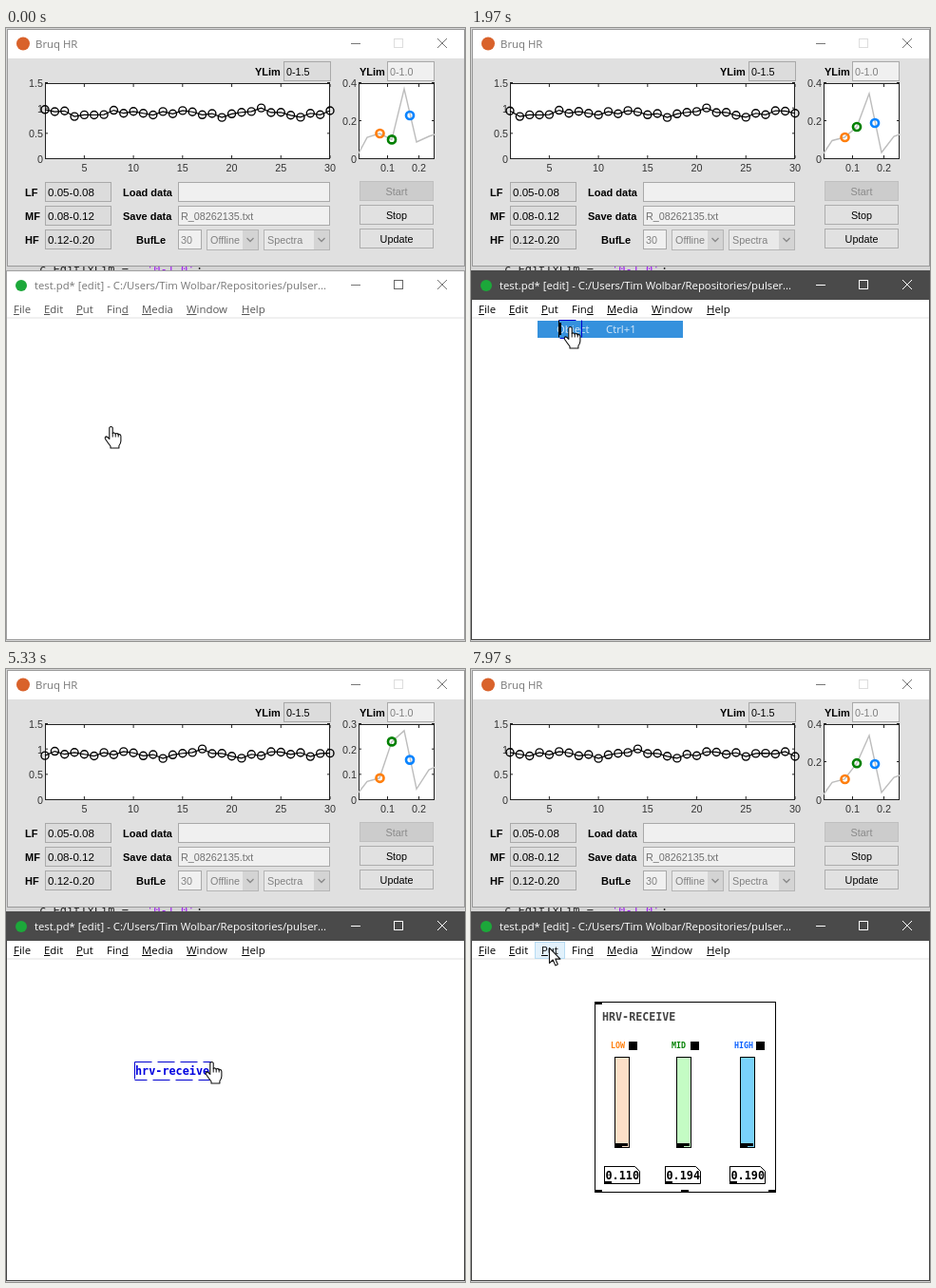
Write an HTML page with a canvas that moves like this. It is 483 by 645 pixels and loops after 8 s.

```html
<!DOCTYPE html>
<html lang="en">
<head>
<meta charset="utf-8">
<title>Heart rate patch</title>
<style>
html, body { margin: 0; width: 100%; height: 100%; overflow: hidden; background: #fff; }
canvas { display: block; }
</style>
</head>
<body>
<canvas id="stage" width="483" height="645"></canvas>
<script>
const g = document.getElementById('stage').getContext('2d');
const LOOP = 8000, FIRST_BEAT = 570, BEAT = 900;
const CREATED = 5560, GRAB = 5830, DROP = 6230;
const SANS = '10.8px "Liberation Sans", Arial, sans-serif';
const FIELD = SANS.replace('10.8', '11.6');
const BOLD = 'bold ' + SANS.replace('10.8', '11');
const UI = '11.4px "Open Sans", sans-serif';
const BLUE = '#0000d0';
const mono = size => `bold ${size}px "DejaVu Sans Mono", monospace`;
const clamp = (v, lo, hi) => Math.min(hi, Math.max(lo, v));

// Beat interval in seconds: slow, breathing and fast rhythms
const interval = i => .909 + .041 * Math.cos(.861 * i) + .026 * Math.cos(.587 * i - .18)
  - .035 * Math.cos(2.513 * i - 1.65);

// Band powers; the line swings above and below the high band's marker
const bands = (beat, low, mid, high, swing, midX = 406, highX = 425) =>
  ({ beat, low, mid, high, swing, midX, highX });
const spectra = [
  bands(0, .135, .103, .230, .14),
  bands(1, .115, .170, .190, .155),
  bands(3, .250, .250, .155, 0, 394, 414),
  bands(4, .115, .220, .215, .175),
  bands(6, .087, .231, .159, .115),
  bands(9, .110, .194, .190, .15)
];

// Pointer moves: start, end, goal
const moves = [
  [30, 200, 140, 392], [570, 1150, 91, 300], [1430, 1730, 104, 314], [1970, 2620, 139, 416],
  [2870, 2970, 216, 413], [5330, 5520, 270, 375], [5600, 5780, 228, 470],
  [GRAB, DROP, 223, 407], [6400, 6620, 347, 469], [6830, 7230, 340, 577], [7300, 7900, 82, 293]
];

function pointerAt(t) {
  let x = 110, y = 419;
  for (const [from, to, goalX, goalY] of moves) {
    const u = clamp((t - from) / (to - from), 0, 1);
    const e = u * u * (3 - 2 * u);
    x += (goalX - x) * e;
    y += (goalY - y) * e;
  }
  return [Math.round(x), Math.round(y)];
}

function text(s, x, y, color = '#000', font = SANS, align = 'left') {
  g.font = font;
  g.fillStyle = color;
  g.textAlign = align;
  g.fillText(s, x, y);
}

function fill(x, y, w, h, color) {
  g.fillStyle = color;
  g.fillRect(x, y, w, h);
}

// Box with a one pixel edge inside its bounds
function box(x, y, w, h, color, edge) {
  fill(x, y, w, h, color);
  g.strokeStyle = edge;
  g.lineWidth = 1;
  g.strokeRect(x + .5, y + .5, w - 1, h - 1);
}

function line(points, color, width = 1) {
  g.beginPath();
  points.forEach(p => g.lineTo(p[0], p[1]));
  g.strokeStyle = color;
  g.lineWidth = width;
  g.stroke();
}

function dot(x, y, r, color) {
  g.beginPath();
  g.arc(x, y, r, 0, Math.PI * 2);
  g.fillStyle = color;
  g.fill();
}

function ring(x, y, color, width) {
  g.beginPath();
  g.arc(x, y, 4, 0, Math.PI * 2);
  g.strokeStyle = color;
  g.lineWidth = width;
  g.stroke();
}

function windowButtons(y, color, middle) {
  line([[363, y + .5], [373, y + .5]], color);
  g.strokeStyle = middle;
  g.strokeRect(408.5, y - 4.5, 9, 9);
  line([[454, y - 5], [464, y + 5]], color);
  line([[464, y - 5], [454, y + 5]], color);
}

function entry(s, x, y, w, back, color, font) {
  box(x, y, w, 21, back, '#a9a9a9');
  text(s, x + 3, y + 15, color, font);
}

function dropdown(s, x, w) {
  box(x, 212, w, 22, '#e9e9e9', '#b5b5b5');
  fill(x + w - 17, 213, 16, 20, '#d4d4d4');
  text(s, x + 4, 227, '#808080');
  const c = x + w - 9;
  line([[c - 3.5, 221], [c, 224.5], [c + 3.5, 221]], '#888', 1.3);
}

function button(s, y, on) {
  box(372, y, 78, 21, on ? '#e1e1e1' : '#ccc', on ? '#adadad' : '#bfbfbf');
  text(s, 411, y + 15, on ? '#000' : '#8a8a8a', SANS, 'center');
}

// White plot with labelled ticks on all four sides
function axes(left, width, top, step, xTicks) {
  const right = left + width;
  box(left, 58, width, 80, '#fff', '#222');
  for (let v = 0; v <= top + .01; v += step) {
    const y = 138 - v / top * 80;
    text(+v.toFixed(1), left - 2, y + 4, '#333', SANS, 'right');
    line([[left, y - .5], [left + 3, y - .5]], '#222');
    line([[right - 3, y - .5], [right, y - .5]], '#222');
  }
  xTicks.forEach(([s, x]) => {
    text(s, x, 151, '#333', SANS, 'center');
    line([[x, 137], [x, 134]], '#222');
    line([[x, 59], [x, 62]], '#222');
  });
}

function drawTrace(n) {
  const x = i => 41 + i * 300 / 29;
  axes(41, 300, 1.5, .5, [5, 10, 15, 20, 25, 30].map(k => [k, x(k - 1)]));
  const points = Array.from({ length: 30 }, (_, i) => [x(i), 138 - interval(n + i) / 1.5 * 80]);
  line(points, '#000', 1.2);
  points.forEach(p => ring(...p, '#000', 1.4));
}

function drawSpectrum({ low, mid, high, swing, midX, highX }) {
  const top = high + swing > .3 ? .4 : .3;
  const at = (x, v) => [x, 138 - v / top * 80];
  axes(371, 80, top, top > .3 ? .2 : .1, [['0.1', 401.5], ['0.2', 434.5]]);
  line([at(371, .03), at(380, low * .85), at(393, low), at(midX, mid), at(highX - 6, high + swing),
    at(highX + 7, high - swing), at(445, .12), at(451, .13)], '#bdbdbd', 1.4);
  ring(...at(393.5, low), '#ff7f0e', 2.7);
  ring(...at(midX, mid), '#008000', 2.7);
  ring(...at(highX, high), '#0a84ff', 2.7);
}

function drawMonitor(n, spectrum) {
  const gray = '#dcdcdc', light = '#f0f0f0';
  box(1, 1, 482, 250, '#e0e0e0', '#9a9a9a');
  fill(2, 2, 480, 30, '#fff');
  dot(18, 16.5, 7, '#d9622b');
  text('Bruq HR', 31, 21, '#777', UI);
  windowButtons(16, '#777', '#ddd');
  text('YLim', 262, 50, '#000', BOLD);
  entry('0-1.5', 292, 35, 50, gray);
  text('YLim', 372, 50, '#000', BOLD);
  entry('0-1.0', 401, 35, 50, light, '#808080');
  ['LF|0.05-0.08', 'MF|0.08-0.12', 'HF|0.12-0.20'].forEach((row, i) => {
    const [label, range] = row.split('|');
    text(label, 20, 177 + 25 * i, '#000', BOLD);
    entry(range, 41, 162 + 25 * i, 70, gray, '#000', FIELD);
  });
  text('Load data', 123, 177, '#000', BOLD);
  entry('', 181, 162, 160, light);
  text('Save data', 123, 202, '#000', BOLD);
  entry('R_08262135.txt', 181, 187, 160, light, '#707070');
  text('BufLe', 137, 227, '#000', BOLD);
  entry('30', 181, 212, 25, light, '#808080');
  dropdown('Offline', 211, 55);
  dropdown('Spectra', 271, 70);
  ['Start', 'Stop', 'Update'].forEach((s, i) => button(s, 161 + 25 * i, i > 0));
  drawTrace(n);
  drawSpectrum(spectrum);
}

// Sliver of the editor that shows between the windows
function drawEditor() {
  fill(0, 0, 483, 645, '#d4d4d4');
  const code = '12px "DejaVu Sans Mono", monospace';
  text('c_EditTxLim = ', 35, 258, '#222', code);
  text("'0-1.0'", 148, 258, '#a020f0', code);
  text(';', 200, 258, '#222', code);
}

function drawPatchWindow(t) {
  const active = t >= 570;
  const ink = active ? '#000' : '#555', title = active ? '#fff' : '#777';
  box(0, 255, 483, 389, '#fff', active ? '#444' : '#a0a0a0');
  if (active) fill(0, 255, 483, 31, '#4a4a4a');
  dot(16, 271, 6, '#1ca83a');
  text('test.pd* [edit] - C:/Users/Tim Wolbar/Repositories/pulser...', 30, 275, title,
    UI.replace('11.4', '11.3'));
  windowButtons(270, title, active ? '#fff' : '#666');
  fill(1, 304, 481, 2, '#f0f0f0');
  const overPut = (t > 1080 && t < 1970) || t > 7830;
  if (overPut) box(67, 287, 32, 18, '#e2f1fb', '#b8dcf3');
  [['File', 8, 0], ['Edit', 40, 0], ['Put', 74, 0], ['Find', 106, 3],
   ['Media', 143, 0], ['Window', 190, 0], ['Help', 248, 0]].forEach(([s, x, u]) => {
    text(s, x, 300, ink, UI);
    const before = g.measureText(s.slice(0, u)).width;
    fill(x + before, 301, g.measureText(s[u]).width, 1, ink);
  });
}

// Dashed box that hangs on the pointer, then takes the typed name
function drawObject(t) {
  if (t < 1970 || t >= CREATED) return;
  const n = clamp(Math.floor((t - 3630) / 147) + 1, 0, 11);
  const [px, py] = pointerAt(Math.min(t, 2670));
  const lag = clamp(1 - (t - 1970) / 400, 0, 1);
  const x = Math.round(px - 4 - 8 * lag) + .5, y = Math.round(py - 3 - 4 * lag) + .5;
  const w = Math.round(Math.max(3, n) * 7.1 + 3);
  g.setLineDash([18, 6]);
  line([[x, y], [x + w, y], [x + w, y + 19], [x, y + 19]], BLUE);
  line([[x, y], [x, y + 19]], n ? BLUE : '#000');
  g.setLineDash([]);
  if (n) text('hrv-receive'.slice(0, n), x + .5, y + 13.5, '#0000e0', mono(11.8));
  else fill(x + .5, y + 2.5, 2, 13, '#000');
}

function drawPatch(t, n, { low, mid, high }) {
  if (t < CREATED) return;
  const [x, y] = pointerAt(clamp(t, GRAB, DROP));
  const live = n > 6;
  const flash = live && (t - FIRST_BEAT) % BEAT <= 230;
  g.save();
  g.translate(x - 93, y - 57);
  box(0, 0, 191, 201, '#fff', t > GRAB && t < 6600 ? BLUE : '#000');
  [[0, 0], [0, 198], [91, 198], [183, 198]].forEach(([a, b]) => fill(a, b, 8, 3, '#000'));
  text('HRV-RECEIVE', 8, 20, '#444', mono(11.7));
  const column = (label, value, labelX, bang, slider, number, color, pale) => {
    text(label, labelX, 49, color, mono(8.3));
    fill(bang, 42, 9, 9, '#000');
    if (!flash) dot(bang + 4.5, 46.5, 2.8, pale);
    box(slider, 58, 16, 96, pale, '#000');
    fill(slider + 1, 149, 13, 3, '#000');
    fill(slider, 151, 8, 3, '#000');
    const a = number + .5;
    line([[a, 173.5], [a + 32, 173.5], [a + 37, 178.5], [a + 37, 191.5],
      [a, 191.5], [a, 173]], '#000');
    fill(number, 189, 8, 3, '#000');
    text(live ? value.toFixed(3) : '0', number + 1.5, 187, '#000', mono(11.8));
  };
  column('LOW', low, 17, 36, 21, 10, '#ff7f0e', '#fcdfc7');
  column('MID', mid, 81, 101, 86, 74, '#008000', '#c4fcc4');
  column('HIGH', high, 147, 170, 153, 142, '#0a60ff', '#7ad2fb');
  g.restore();
}

const menu = ['Object|Ctrl+1', 'Message|Ctrl+2', 'Number|Ctrl+3', 'List|Ctrl+4', 'Symbol|',
  'Comment|Ctrl+5', '', 'Bang|Shift+Ctrl+B', 'Toggle|Shift+Ctrl+T', 'Number2|Shift+Ctrl+N',
  'Vslider|Shift+Ctrl+V', 'Hslider|Shift+Ctrl+J', 'Vradio|Shift+Ctrl+D',
  'Hradio|Shift+Ctrl+I', 'VU Meter|Shift+Ctrl+U', 'Canvas|Shift+Ctrl+C', '',
  'Graph|', 'Array|'];

// Fades in whole; after the choice only the chosen row fades out
function drawMenu(t) {
  if (t < 1430 || t > 2100) return;
  const closing = t >= 1970;
  g.globalAlpha = closing ? 1 - (t - 1970) / 130 : Math.min(1, (t - 1400) / 150);
  if (!closing) box(67, 305, 158, 315, '#f2f2f2', '#ccc');
  let y = 308;
  menu.slice(0, closing ? 1 : menu.length).forEach((row, i) => {
    if (!row) {
      fill(92, y + 3, 128, 1, '#d0d0d0');
      y += 7;
      return;
    }
    const lit = i === 0 && t > 1600;
    if (lit) fill(70, y, 153, 18, '#3591dd');
    const [name, key] = row.split('|');
    const ink = lit ? '#d7e9f8' : '#000';
    text(name, 90, y + 13, ink, UI);
    text(key, 142, y + 13, ink, UI);
    y += 17.4;
  });
  g.globalAlpha = 1;
}

const arrow = new Path2D('M0 0V16L3.7 12.5L6.3 18.4L8.8 17.3L6.3 11.6H11.4Z');
const hand = new Path2D('M-1.7 1Q0 -1 1.7 1V7Q3.5 5.6 4.7 7.6Q6.6 6.2 7.7 8.4Q10 7.4 10.4 10' +
  'V15Q10.2 18 8.4 20V22.5H-.5V20.5Q-3 17.5 -5.8 13.3Q-7 10.8 -5 10.4Q-3.5 10.5 -1.7 13Z');

function drawPointer(t) {
  const [x, y] = pointerAt(t);
  const isArrow = y < 306;
  const shape = isArrow ? arrow : hand;
  g.save();
  g.translate(x + .5, y + .5);
  g.fillStyle = '#fff';
  g.fill(shape);
  g.strokeStyle = '#111';
  g.lineWidth = 1.1;
  g.lineJoin = 'round';
  g.stroke(shape);
  if (!isArrow) [1.7, 4.7, 7.7].forEach(k => line([[k, 7], [k, 11]], '#111'));
  g.restore();
}

function draw(now) {
  const t = now % LOOP;
  const n = Math.max(0, Math.floor((t - FIRST_BEAT) / BEAT) + 1);
  const spectrum = spectra.findLast(s => s.beat <= n);
  drawEditor();
  drawMonitor(n, spectrum);
  drawPatchWindow(t);
  drawPatch(t, n, spectrum);
  drawMenu(t);
  drawObject(t);
  drawPointer(t);
}

let start;
function tick(now) {
  start ??= now;
  draw(now - start);
  requestAnimationFrame(tick);
}
draw(0);
requestAnimationFrame(tick);
</script>
</body>
</html>
```
